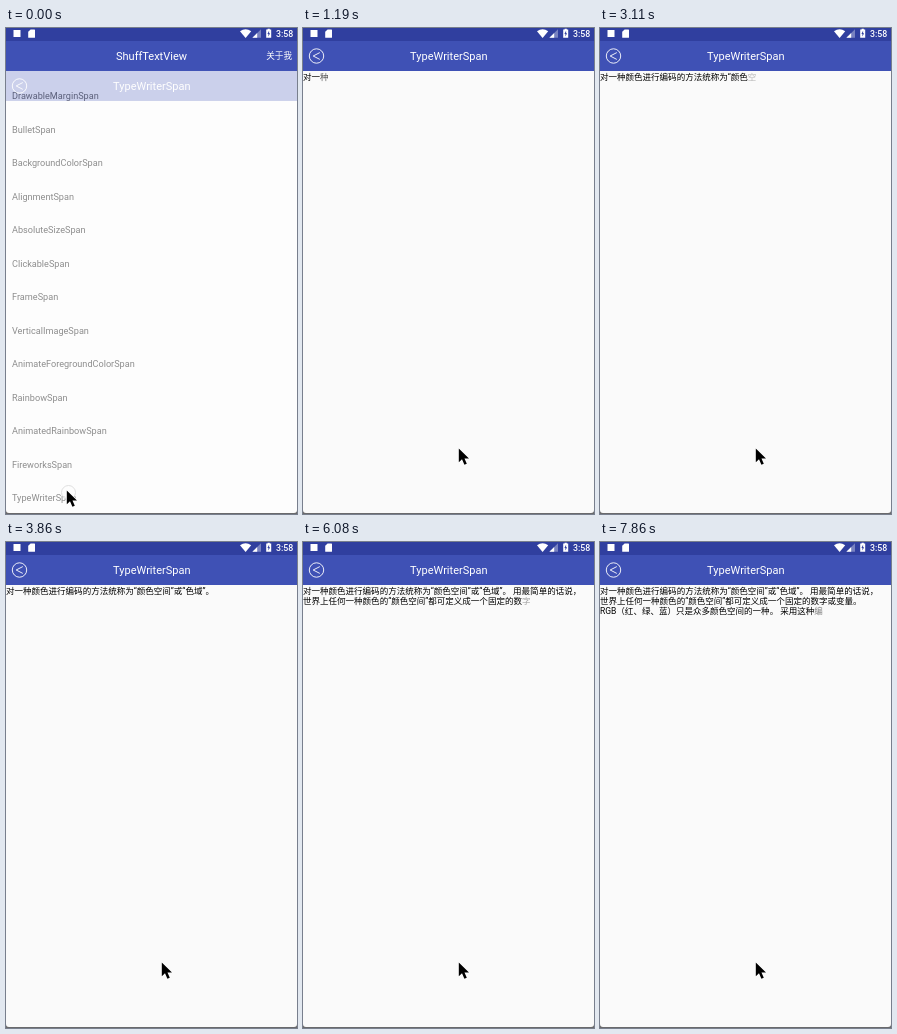
An HTML page for the animation above (8 s loop, 291 px wide and 486 px high).

```html
<!DOCTYPE html>
<html lang="zh-CN">
<head>
<meta charset="utf-8">
<title>TypeWriterSpan</title>
<style>
  html, body { margin: 0; width: 100%; height: 100%; overflow: hidden; background: #fafafa; }
  svg { display: block; width: 100%; height: 100%; }
  text { font-family: Roboto, "Noto Sans CJK SC", "Noto Sans CJK", sans-serif; white-space: pre; text-spacing-trim: space-all; }
  .title { font-size: 11px; fill: #fff; text-anchor: middle; }
  .row { font-size: 9.13px; fill: #666; }
  .line { font-size: 8.53px; fill: #000; }
</style>
</head>
<body>
<svg viewBox="0 0 291 486">
  <g id="list">
    <rect width="291" height="486" fill="#fff"/>
    <rect y="13" width="291" height="30" fill="#3f51b5"/>
    <text class="title" x="145.5" y="32.3">ShuffTextView</text>
    <text x="286" y="31.3" font-size="8.6" fill="#fff" text-anchor="end">关于我</text>
    <g id="rows"></g>
    <circle id="tap" cx="62.5" cy="464.5" r="7" fill="#fff" fill-opacity=".75" stroke="#ccc" stroke-width=".8"/>
  </g>

  <g id="page">
    <rect y="13" width="291" height="473" fill="#fafafa"/>
    <rect y="13" width="291" height="30" fill="#3f51b5"/>
    <g fill="none" stroke="#fff" stroke-width=".9">
      <circle cx="13.5" cy="28" r="7.2"/>
      <path d="M16.8 24.6L10.2 28L16.8 31.4"/>
    </g>
    <text class="title" x="145.8" y="32.3">TypeWriterSpan</text>
    <g id="lines"></g>
  </g>

  <g id="status" fill="#fff">
    <rect width="291" height="13" fill="#303f9f"/>
    <rect x="7.5" y="2" width="7" height="7"/>
    <path d="M24.6 1.4H28.4Q29 1.4 29 2V9.2Q29 9.8 28.4 9.8H22.8Q22.2 9.8 22.2 9.2V3.8Z"/>
    <path d="M234 3.2Q239.6 -.8 245.2 3.2L239.6 10Z"/>
    <path d="M255 1.2V9.8H246.4Z" fill-opacity=".35"/>
    <path d="M251.2 5V9.8H246.4Z"/>
    <path d="M261.6 1.6V.8H263.8V1.6H265.2V9.8H260.2V1.6Z"/>
    <path d="M263.1 2.8L261.4 6H262.4V8.4L264.1 5.2H263.1Z" fill="#303f9f"/>
    <text x="287.3" y="9.2" font-size="8.8" font-weight="500" text-anchor="end">3:58</text>
  </g>

  <path d="M0 481H291V486H0ZM0 481V482Q0 485 3 485H288Q291 485 291 482V481Z" fill="#6a6a6c" fill-rule="evenodd"/>
  <path id="cursor" d="M0 0V13.8L3.2 10.8L5.6 16.2L8 15.2L5.7 10H10.2Z" fill="#000" stroke="#fff" stroke-width="1.2" paint-order="stroke" stroke-linejoin="round"/>
</svg>

<script>
const LOOP = 8000, STEP = 148.4;
const TYPE_DELAY = 20, TYPE_TIME = 15000, TOTAL_CHARS = 180;

const ROWS = ['DrawableMargin', 'Bullet', 'BackgroundColor', 'Alignment', 'AbsoluteSize', 'Clickable',
  'Frame', 'VerticalImage', 'AnimateForegroundColor', 'Rainbow', 'AnimatedRainbow', 'Fireworks', 'TypeWriter'];
const LINES = [
  '对一种颜色进行编码的方法统称为“颜色空间”或“色域”。 用最简单的话说，',
  '世界上任何一种颜色的“颜色空间”都可定义成一个固定的数字或变量。 ',
  'RGB（红、绿、蓝）只是众多颜色空间的一种。 采用这种编'
];

const $ = id => document.getElementById(id);
const clamp = (v, lo = 0, hi = 1) => Math.min(hi, Math.max(lo, v));

function add(parent, tag, attrs = {}) {
  const el = document.createElementNS('http://www.w3.org/2000/svg', tag);
  for (const key in attrs) el.setAttribute(key, attrs[key]);
  return parent.appendChild(el);
}

ROWS.forEach((name, i) => {
  add($('rows'), 'text', { class: 'row', x: 6, y: 71.2 + i * 33.5 }).textContent = name + 'Span';
});

const lines = LINES.map((text, i) => {
  const el = add($('lines'), 'text', { class: 'line', x: 0, y: 52.3 + i * 9.9 });
  return { text, full: add(el, 'tspan'), fading: add(el, 'tspan') };
});

// Accelerate-decelerate progress, measured in characters
function typedChars(t) {
  const x = clamp((t - TYPE_DELAY) / TYPE_TIME);
  return TOTAL_CHARS * (1 - Math.cos(Math.PI * x)) / 2;
}

function drawText(count) {
  for (const { text, full, fading } of lines) {
    const n = clamp(count, 0, text.length), whole = Math.floor(n);
    full.textContent = text.slice(0, whole);
    fading.textContent = n > whole ? text[whole] : '';
    fading.setAttribute('fill-opacity', (n - whole).toFixed(3));
    count -= text.length;
  }
}

function render(time) {
  const t = Math.floor((time + 8) / STEP) * STEP;

  const slide = 39 * (1 - clamp((t + 18) / 350)) ** 5;
  const alpha = 1 - (1 - clamp((t + 15) / 200)) ** 4;
  $('page').setAttribute('transform', `translate(0 ${slide.toFixed(2)})`);
  $('page').setAttribute('opacity', alpha.toFixed(3));
  $('tap').setAttribute('visibility', t < STEP ? 'visible' : 'hidden');

  const m = clamp((t - 250) / 550), ease = m * m * (3 - 2 * m);
  $('cursor').setAttribute('transform', `translate(${60.8 + 95 * ease} ${462.5 - 42 * ease})`);

  drawText(typedChars(t));
}

const start = performance.now();
function tick() {
  render((performance.now() - start) % LOOP);
  requestAnimationFrame(tick);
}
tick();
</script>
</body>
</html>
```
